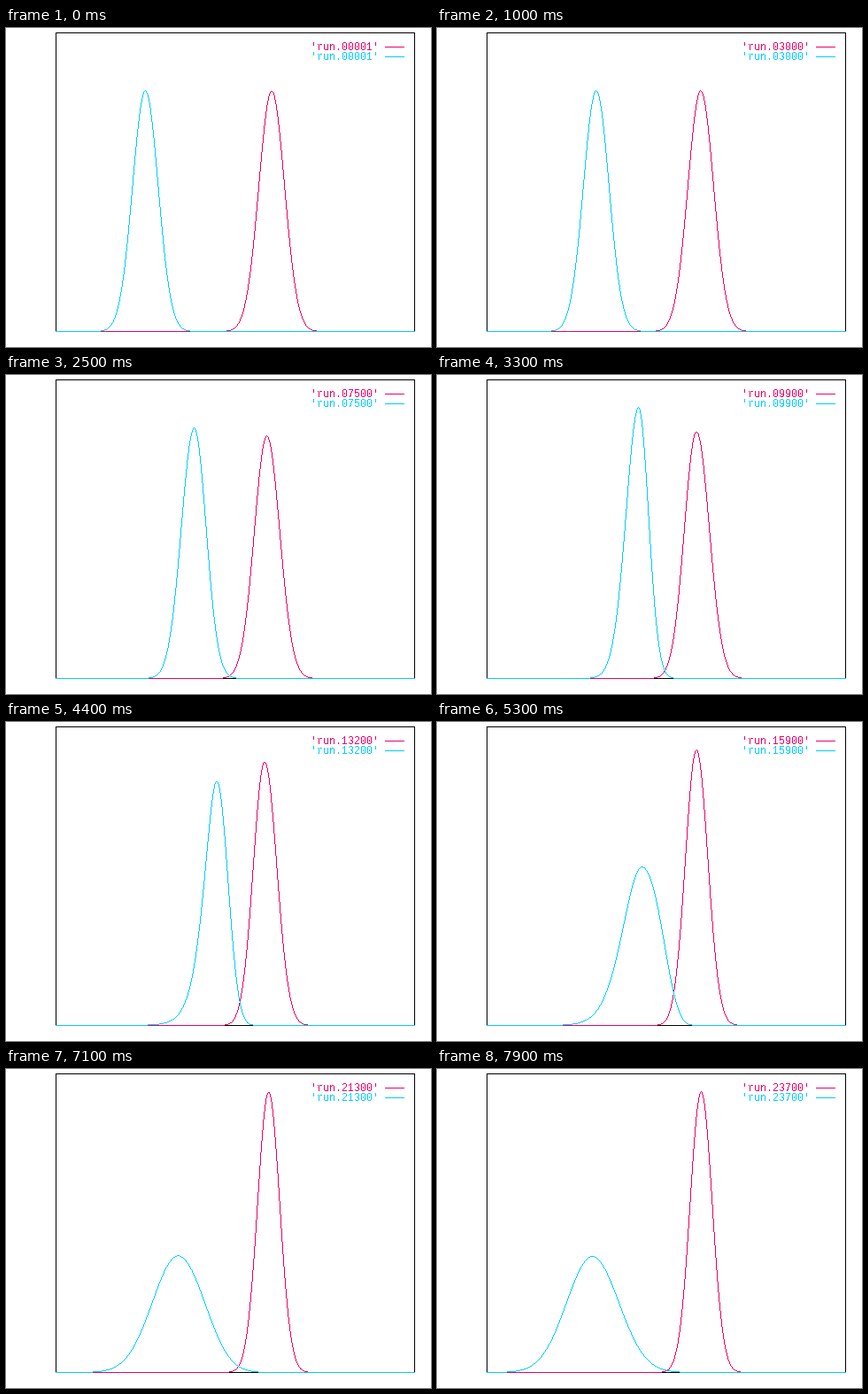
A matplotlib script for the animation above (8000 ms loop, 480 by 360 pixels).

```python
import matplotlib.pyplot as plt
import numpy as np
from matplotlib.animation import FuncAnimation
from matplotlib.patches import Rectangle

W, H, DPI = 480, 360, 100
FRAMES, STEP_MS = 80, 100
LEFT, RIGHT, TOP, BASE = 56, 461, 5, 342
PINK, CYAN = "#ee0066", "#00ccff"
AREA = 3944  # height times width of an undisturbed pulse


def step(t, mid, scale):
    return 1 / (1 + np.exp(-(t - mid) / scale))


def bump(t, mid, scale):
    return np.exp(-0.5 * ((t - mid) / scale) ** 2)


def bend(t, start, speed, turn, mid, scale):
    """Steady drift whose speed changes smoothly by `turn` around `mid`."""
    return start + speed * t + turn * scale * np.log1p(np.exp((t - mid) / scale))


def bell(x, centre, height, left, right):
    """Bell curve; each side has a width and its growth with distance."""
    d = np.abs(x - centre)
    width = np.where(x < centre, left[0] + left[1] * d, right[0] + right[1] * d)
    return height * np.exp(-0.5 * (d / np.maximum(width, 4)) ** 2)


def pink_pulse(x, t):
    height = 272 + 45 * step(t, 42.3, 5.45)
    width, lean = AREA / height, 0.04 * bump(t, 40, 10)
    return bell(x, bend(t, 299.6, -0.22, 0.435, 43, 4.8), height,
                (width * (1 - lean), 0), (width * (1 + lean), 0))


def cyan_pulse(x, t):
    squeeze, spread = bump(t, 38.5, 8), step(t, 53, 3)
    trail, front = bump(t, 45, 7), bump(t, 58, 7)
    height = 272 + 47 * squeeze - 141 * step(t, 49, 4.2)
    left = 14.5 + 14.5 * spread - 3.3 * trail, 0.13 * trail
    right = 14.4 + 15.6 * spread - 4 * squeeze + 7 * front, -0.23 * front
    return bell(x, bend(t, 157, 2.25, -4.65, 44.65, 6.2), height, left, right)


fig = plt.figure(figsize=(W / DPI, H / DPI), dpi=DPI, facecolor="white")
ax = fig.add_axes([0, 0, 1, 1])
ax.set(xlim=(0, W), ylim=(H, 0))
ax.axis("off")

columns = np.arange(LEFT, RIGHT + 1)
edges = np.arange(LEFT, RIGHT + 2)
half_steps = np.arange(LEFT - 0.5, RIGHT + 1)


def box(x, y, w, h, color):
    ax.add_patch(Rectangle((x, y), w, h, fc=color, lw=0, snap=False))


def trace(pulse, t):
    """Top and bottom of the pixel run the curve fills in each column."""
    y = np.round(pulse(half_steps, t))
    low, high = np.minimum(y[:-1], y[1:]), np.maximum(y[:-1], y[1:])
    return BASE - np.maximum(high - 1, low), BASE - low + 1


def curve(pulse, color):
    top, bottom = trace(pulse, 0)
    return ax.stairs(top, edges, baseline=bottom, fill=True, color=color,
                     lw=0, snap=False)


def legend(y, color):
    box(428, y, 22, 1, color)
    return ax.text(344, y + 4, "", color=color, family="Liberation Mono",
                   size=11.67 * 72 / DPI, va="baseline", antialiased=False)


for x in (LEFT, RIGHT):
    box(x, TOP, 1, BASE - TOP + 1, "black")
for y in (TOP, BASE):
    box(LEFT, y, RIGHT - LEFT + 1, 1, "black")

curves = [(curve(pulse, color), pulse)
          for pulse, color in ((pink_pulse, PINK), (cyan_pulse, CYAN))]
labels = [legend(21, PINK), legend(32, CYAN)]


def draw(n):
    for patch, pulse in curves:
        top, bottom = trace(pulse, n)
        patch.set_data(top, edges, bottom)
    for label in labels:
        label.set_text(f"'run.{max(1, 300 * n):05d}'")
    return [patch for patch, _ in curves] + labels


anim = FuncAnimation(fig, draw, frames=FRAMES, interval=STEP_MS,
                     repeat=True, repeat_delay=0)
plt.show()
```
